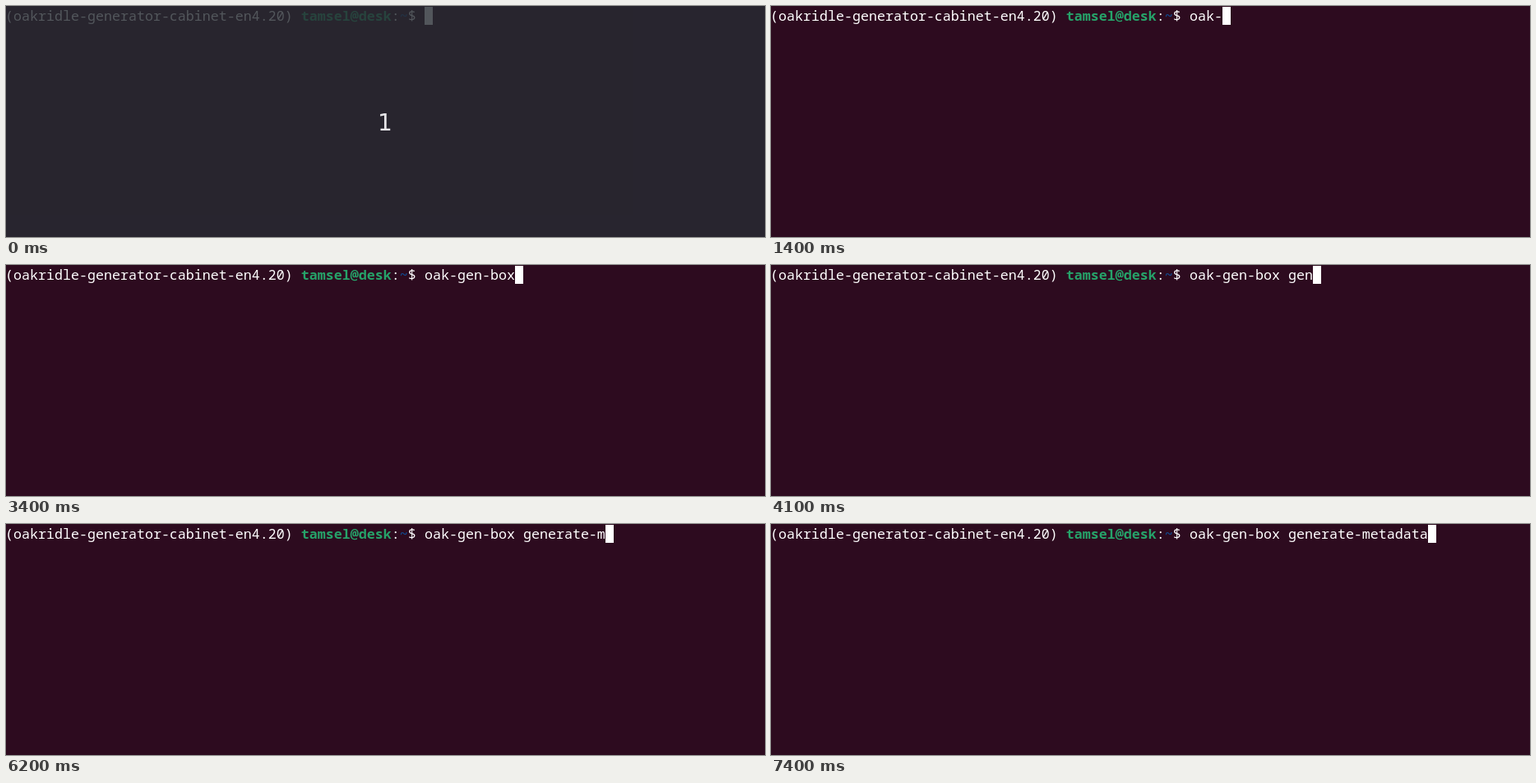
Recreate the animation shown at these times as an HTML page. Size 923 by 282 pixels, loop 8 s.

```html
<!DOCTYPE html>
<html lang="en">
<head>
<meta charset="utf-8">
<title>Terminal typing</title>
<style>
  html, body { margin: 0; width: 100%; height: 100%; overflow: hidden; background: #2d0b1f; }
  svg { display: block; width: 923px; height: 282px; }
  .line { font: 500 16.667px "Noto Sans Mono", "DejaVu Sans Mono", monospace; fill: #fff; white-space: pre; }
  .user, .path { font-weight: 700; }
  .user { fill: #26a269; }
  .path { fill: #12488b; }
  .count { font: 28px "DejaVu Sans", sans-serif; fill: #e6e5e8; text-anchor: middle; }
</style>
</head>
<body>
<svg viewBox="0 0 923 282">
  <rect width="923" height="282" fill="#2d0b1f"/>
  <text class="line" x="-1" y="18" xml:space="preserve">(oakridle-generator-cabinet-en4.20) <tspan class="user">tamsel@desk</tspan>:<tspan class="path">~</tspan>$</text>
  <text class="line" id="typed" x="509" y="18" xml:space="preserve"></text>
  <rect id="cursor" x="509" y="1" width="10" height="22" fill="#fff"/>
  <g id="countdown">
    <rect width="923" height="282" fill="rgb(39,44,51)" fill-opacity=".8"/>
    <text class="count" x="461" y="152">1</text>
  </g>
</svg>
<script>
  const LOOP = 8000, TICK = 100, CELL = 10, START_X = 509;

  // Each burst types its text at an even pace, in ms per character
  const bursts = [
    { text: "oak-gen", start: 800, pace: 217 },
    { text: "-box ", start: 2690, pace: 225 },
    { text: "gene", start: 3820, pace: 140 },
    { text: "rate", start: 4590, pace: 205 },
    { text: "-", start: 5700, pace: 200 },
    { text: "metadata", start: 6210, pace: 184 }
  ];
  const typed = document.getElementById("typed");
  const cursor = document.getElementById("cursor");
  const countdown = document.getElementById("countdown");

  // The screen refreshes once per tick and shows every key pressed within it
  function typedBy(time) {
    const tickEnd = (Math.floor(time / TICK) + 1) * TICK;
    return bursts.map(({ text, start, pace }) =>
      text.slice(0, Math.max(0, Math.ceil((tickEnd - start) / pace)))
    ).join("");
  }

  function render(time) {
    const text = typedBy(time);
    typed.textContent = text;
    cursor.setAttribute("x", START_X + text.length * CELL);
    countdown.style.display = time < TICK ? "" : "none";
  }

  const start = performance.now();
  function tick() {
    render((performance.now() - start) % LOOP);
    requestAnimationFrame(tick);
  }
  tick();
</script>
</body>
</html>
```
